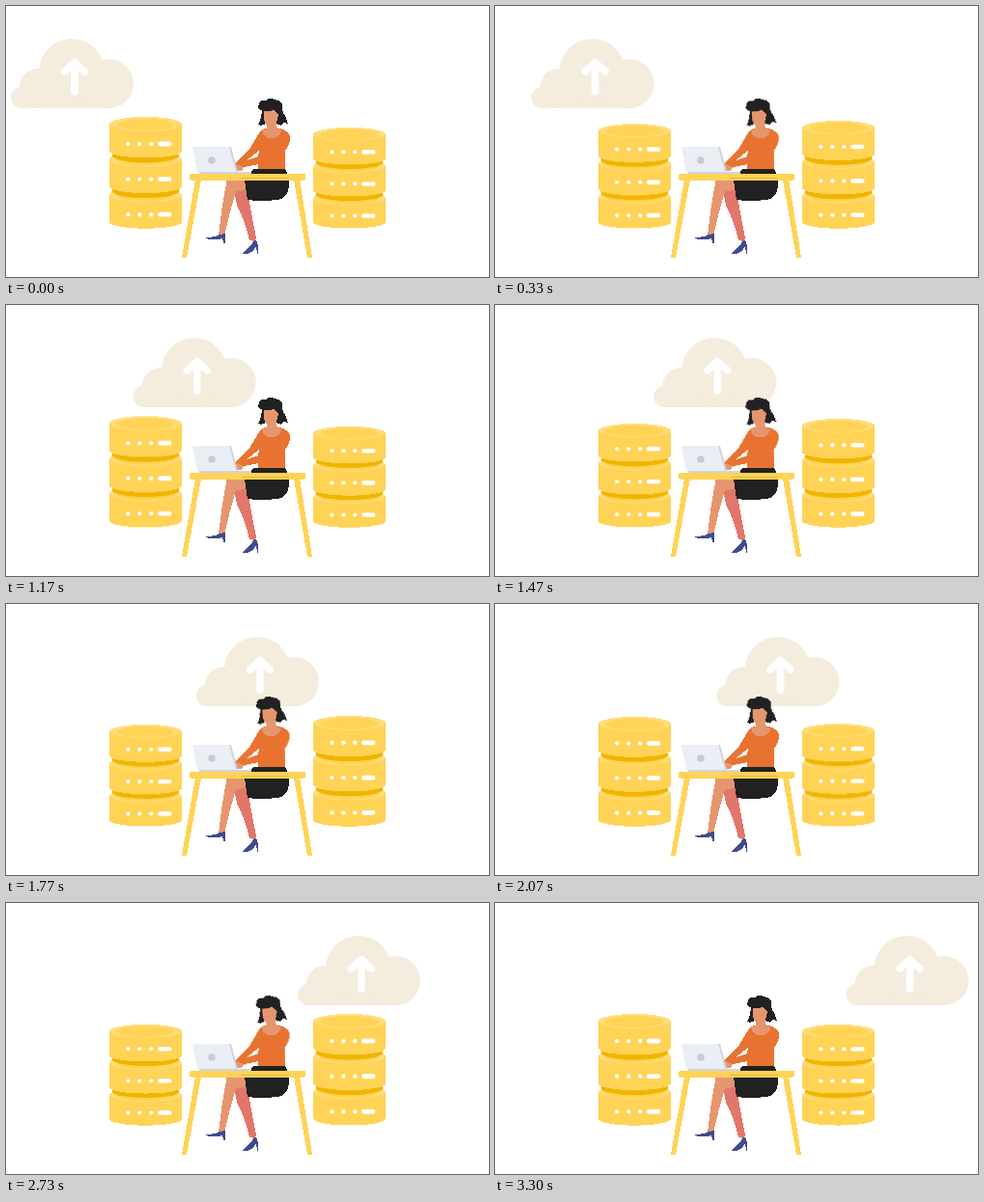
Recreate the animation shown at these times as an HTML page without scripts. Size 500 by 281 pixels, loop 3.33 s.

```html
<!DOCTYPE html>
<html lang="en">
<head>
<meta charset="utf-8">
<title>Cloud upload</title>
<style>
  html, body { margin: 0; width: 100%; height: 100%; overflow: hidden; background: #fff; }
  svg { display: block; width: 100vw; height: 100vh; }

  .gold { fill: #ffd356; }
  .rim { fill: #ffdc76; }
  .shade { fill: #efb500; }
  .white { fill: #fff; }
  .skin { fill: #e6966f; }
  .orange { fill: #e87331; }
  .black { fill: #212121; }
  .blue { fill: #3f4c91; }
  .crisp { shape-rendering: crispEdges; }
  .arrow { fill: none; stroke: #fff; stroke-width: 7.5; stroke-linecap: round; stroke-linejoin: round; }

  /* 100 ticks carry the cloud across the stage */
  .cloud { fill: #f4ecdd; animation: drift 3330ms steps(100) infinite; }
  .stack, .torso, .head { animation: squash 555ms cubic-bezier(.37, 0, .63, 1) infinite alternate; }
  .stack { transform-origin: 0 230px; }
  .late { animation-direction: alternate-reverse; }
  .torso { animation-name: lean; transform-origin: 274px 172px; }
  .head { animation-name: nod; transform-origin: 274px 124px; }

  @keyframes drift { to { transform: translateX(362px); } }
  @keyframes squash { to { transform: scaleY(.903); } }
  @keyframes lean { to { transform: rotate(-.8deg); } }
  @keyframes nod { to { transform: rotate(-4deg); } }
</style>
</head>
<body>
<svg viewBox="0 0 500 281" preserveAspectRatio="none">
  <defs>
    <g id="disc">
      <path class="gold crisp" d="M107 122.5V150.5A37.5 7 0 0 0 182 150.5V122.5Z"/>
      <ellipse class="rim crisp" cx="144.5" cy="122.5" rx="37.5" ry="7.5"/>
      <ellipse class="gold" cx="144.5" cy="123" rx="30" ry="6"/>
      <g class="white">
        <circle cx="126.3" cy="143" r="2.2"/>
        <circle cx="138.3" cy="143" r="2.2"/>
        <circle cx="150.3" cy="143" r="2.2"/>
        <rect x="157" y="140.6" width="14.5" height="4.8" rx="2.4"/>
      </g>
    </g>
    <ellipse id="seam" class="shade" cx="144.5" cy="155" rx="35" ry="7.5"/>
    <g id="tower">
      <use href="#disc" y="73.2"/>
      <use href="#seam" y="36.6"/>
      <use href="#disc" y="36.6"/>
      <use href="#seam"/>
      <use href="#disc"/>
    </g>
  </defs>

  <g class="cloud">
    <rect x="5" y="84" width="112" height="22" rx="11"/>
    <circle cx="33" cy="84" r="19"/>
    <circle cx="68" cy="68" r="34"/>
    <circle cx="106.5" cy="80.5" r="25.5"/>
    <path class="arrow" d="M71 89V59M60.5 68L71 58.5L81.5 68"/>
  </g>

  <g class="stack"><use href="#tower"/></g>
  <g class="stack late"><use href="#tower" x="211"/></g>

  <g class="crisp">
    <!-- legs and shoes -->
    <path fill="#e2766a" d="M236 190H250Q252 206 259 240L258 244L252 243Q248 224 239 207Z"/>
    <path class="skin" d="M229 178H250V191L238 192Q231 216 226 238L220 238Q223 208 229 178Z"/>
    <path class="blue" d="M207 240Q216 240 221 237L227 236V245L226 247L224 241Q216 244 207 241Z"/>
    <path class="blue" d="M245 256Q252 251 257 243L260 244Q262 250 261 257H260L259 249Q255 258 245 257Z"/>

    <g class="torso">
      <path class="orange" d="M265 128Q274 125 284 127Q294 130 294 137Q294 143 289 150V171H261V164L247 167L241 169L236 164L251 150L262 132Z"/>
      <path class="white" d="M249 160L262 150L261 156Z"/>
      <path class="skin" d="M270 120H280V127L285 129Q284 137 275 137Q267 137 265 129L270 127Z"/>
      <g class="head">
        <path class="black" d="M266 106L276 97Q282 97 285 100Q287 103 286 107Q287 112 290 116L292 122L287 121L285 124L280 122L270 120Q267 125 261 123Q264 118 265 109Z"/>
        <path class="skin" d="M267 108H280Q283 112 281 117Q280 125 274 126Q267 124 267 115Z"/>
        <path class="black" d="M263 108Q260 105 262 102Q262 97 269 98Q273 94 278 97Q285 99 285 106L281 113Q280 108 276 108Q270 111 263 108Z"/>
      </g>
    </g>
    <path class="black" d="M257 169H288Q293 172 293 184Q293 199 281 201Q264 203 250 201L247 181H250Q251 173 257 169Z"/>
    <path class="skin" d="M236 167L239 164L246 167L244 171L237 171Z"/>

    <!-- desk -->
    <path class="gold" d="M196 180H202L187 261H182ZM298 180H304L317 261H312Z"/>
    <rect class="gold" x="190" y="174" width="120" height="6.5" rx="2"/>
    <path fill="#e6b63a" d="M244 178H293V179H244Z"/>
  </g>

  <!-- laptop -->
  <path fill="#d0d3df" d="M194 146H233L240 172H254V174H200Z"/>
  <path fill="#eceef6" d="M193 146H231L238 172H198Z"/>
  <circle fill="#c8cbd7" cx="213" cy="160" r="3.8"/>
</svg>
</body>
</html>
```
